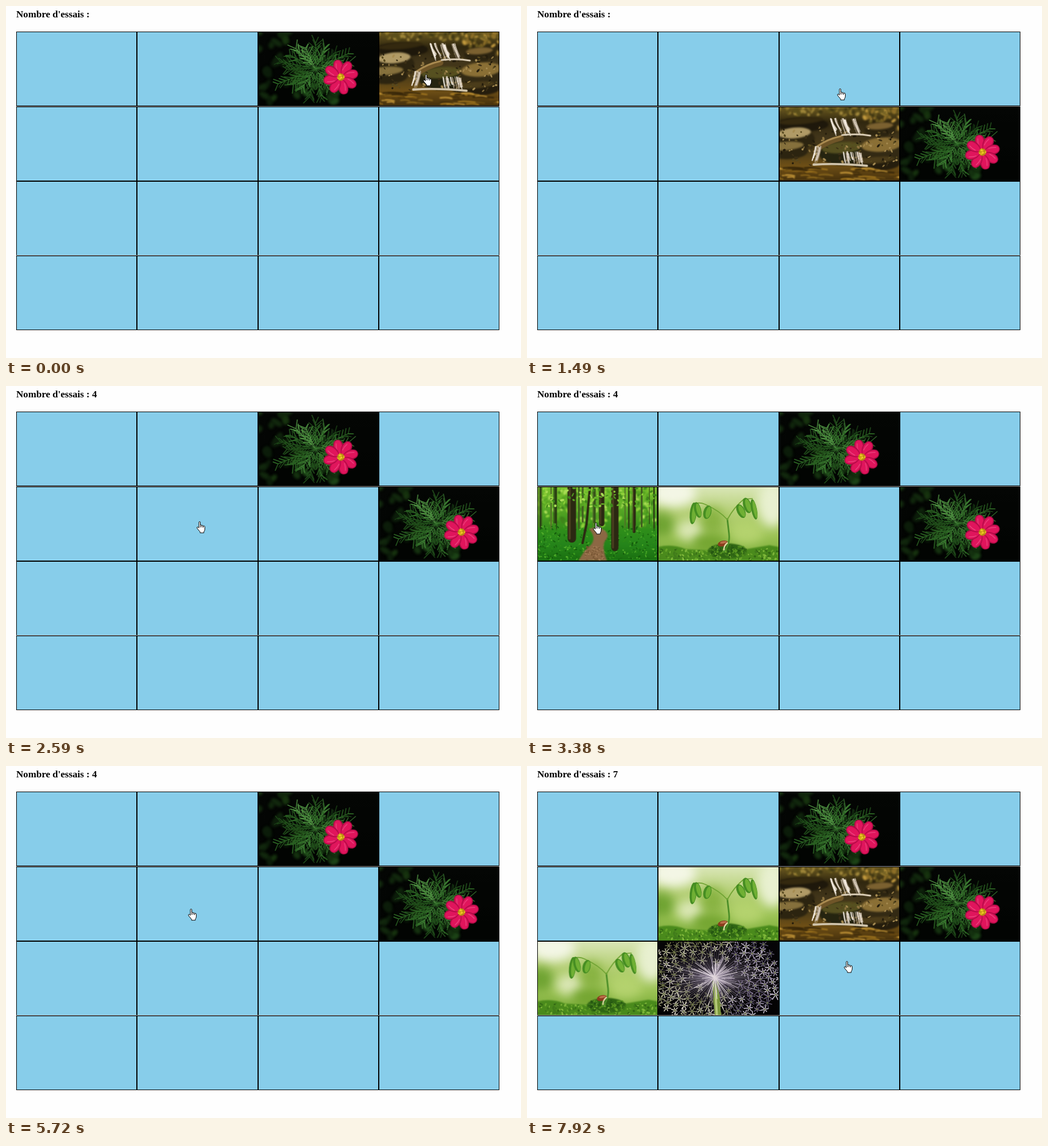
An HTML page with a canvas for the animation above (8000 ms loop, 905 px wide and 619 px high).

```html
<!DOCTYPE html>
<html lang="fr">
<head>
<meta charset="utf-8">
<title>Memory</title>
<style>
html, body { margin: 0; width: 100%; height: 100%; overflow: hidden; background: #fefefe; }
canvas { position: absolute; left: 0; top: 0; }
p { position: absolute; left: 18px; top: 5px; margin: 0; white-space: pre; color: #000;
  font: bold 17.1px/20px "Liberation Serif", "Times New Roman", serif; }
</style>
</head>
<body>
<canvas id="stage" width="905" height="619"></canvas>
<p>Nombre d'essais : <span id="count"></span></p>
<script>
const LOOP = 8000, TAU = Math.PI * 2;
const W = 211, H = 129;              // photo size
const LEFT = 18, TOP = 45.4, STEP_X = 212.25, STEP_Y = 131.3;
const CLOSE_DELAY = 570;             // a wrong pair stays open this long
const edgeX = col => Math.round(LEFT + col * STEP_X);
const edgeY = row => Math.round(TOP + row * STEP_Y);

// Photos lying under the cards, by row
const DEAL = [
  [, , "flower", "falls"],
  ["forest", "sprout", "falls", "flower"],
  ["sprout", "allium"],
  []
];

// Pointer stops; a click turns the card below
const at = (t, x, y) => ({ t, x, y });
const click = (t, x, y) => ({ t, x, y, hit: true });
const STOPS = [
  click(-600, 545, 120), click(-300, 733, 120), at(160, 733, 120),
  click(560, 742, 225), click(1000, 548, 225), at(1490, 545, 145),
  click(1750, 552, 105), click(2046, 735, 225), at(2330, 409, 257),
  at(2590, 335, 238), click(2990, 335, 238), click(3240, 116, 240),
  at(3380, 116, 240), click(4080, 112, 358), at(4710, 272, 335),
  at(4870, 307, 345), click(5140, 150, 250), at(5430, 140, 238),
  at(5720, 320, 251), click(5860, 320, 251), click(6300, 130, 358),
  click(6890, 300, 362), click(7475, 540, 255), at(7920, 557, 343)
];

// Play the game once: when each card is open, and when the score changes
function play() {
  const cards = [], scores = [];
  let tries = 1, first = null;
  for (const { t, x, y } of STOPS.filter(s => s.hit)) {
    const col = Math.floor((x - LEFT) / STEP_X), row = Math.floor((y - TOP) / STEP_Y);
    const card = { col, row, photo: DEAL[row][col], from: t, to: Infinity };
    cards.push(card);
    if (!first) { first = card; continue; }
    tries++;
    if (first.photo === card.photo) scores.push({ t, tries });
    else if (t + CLOSE_DELAY < LOOP) first.to = card.to = t + CLOSE_DELAY;
    first = null;
  }
  return { cards, scores };
}
const { cards, scores } = play();

let seed = 1;
function rnd(a, b = 0) {
  seed = (seed * 16807) % 2147483647;
  return b + (a - b) * seed / 2147483647;
}
const pick = list => list[Math.floor(rnd(list.length))];
const times = (n, f) => { for (let i = 0; i < n; i++) f(i); };

function brush(g) {
  g.lineCap = "round";
  return {
    g,
    fade(y, h, ...stops) {
      const f = g.createLinearGradient(0, y, 0, y + h);
      stops.forEach((c, i) => f.addColorStop(i / (stops.length - 1), c));
      g.fillStyle = f;
      g.fillRect(0, y, W, h);
    },
    oval(c, x, y, rx, ry = rx, turn = 0) {
      g.fillStyle = c;
      g.beginPath();
      g.ellipse(x, y, rx, ry, turn, 0, TAU);
      g.fill();
    },
    shape(c, d) { g.fillStyle = c; g.fill(new Path2D(d)); },
    line(c, w, d) { g.strokeStyle = c; g.lineWidth = w; g.stroke(new Path2D(d)); },
    ray(c, w, x, y, a, r) { this.line(c, w, `M${x} ${y}l${Math.cos(a) * r} ${Math.sin(a) * r}`); },
    soft(px, draw) { g.filter = `blur(${px}px)`; draw(); g.filter = "none"; },
    flecks(n, colors, x, y, w, h, size) {
      times(n, () => this.oval(pick(colors), x + rnd(w), y + rnd(h), rnd(size, size / 3), rnd(size * .6, size / 4), rnd(3)));
    }
  };
}

const PHOTOS = {
  flower(b) {
    b.fade(0, H, "#040604", "#020402");
    b.soft(2, () => {
      b.flecks(22, ["#11270d", "#0c1d0a", "#17330f"], 0, 0, 80, H, 14);
      b.flecks(10, ["#14310f", "#1d4417"], 60, 85, 110, 40, 14);
    });
    const greens = ["#2c6424", "#3d7d33", "#22501c", "#4f9142"];
    times(19, i => {
      const a = i * TAU / 19 + rnd(.2), reach = rnd(1, .65);
      const dx = Math.cos(a) * 76 * reach, dy = Math.sin(a) * 58 * reach;
      const color = pick(greens);
      b.line(color, 1.3, `M100 64l${dx} ${dy}`);
      for (let k = .2; k < 1; k += .1)
        for (const side of [-1, 1])
          b.ray(color, rnd(1.9, .9), 100 + dx * k, 64 + dy * k, a + side * rnd(.9, .4), rnd(17, 8));
    });
    b.g.save();
    b.g.translate(145, 79);
    times(8, i => {
      b.g.rotate(i ? TAU / 8 : -1.78);
      b.shape("#ad0a45", "M3 0C9-10 24-12 30-5Q33 0 29 5C23 11 9 9 3 0Z");
      b.shape("#e0155c", "M4 0C10-8 23-10 29-4Q31 0 28 4C22 8 10 7 4 0Z");
      b.line("#f0568c", 1, "M12-4Q18-5 25-3");
    });
    b.oval("#b88a12", 0, 0, 6.5);
    b.flecks(20, ["#f6d428", "#e2b51c"], -5, -5, 10, 10, 2);
    b.g.restore();
  },

  falls(b) {
    b.fade(0, H, "#6c5a20", "#30270f", "#41351a", "#4a3b18", "#6e4f16", "#46310d");
    const rock = (x, y, rx, ry, top, base = "#2c2410") => {
      b.oval(base, x, y + ry * .3, rx, ry);
      b.oval(top, x - rx * .05, y - ry * .25, rx * .85, ry * .5, -.08);
    };
    b.soft(1.5, () => {
      b.flecks(60, ["#8a742b", "#5b4f1b", "#a48a3c", "#3f3814"], 0, 0, W, 14, 6);
      b.flecks(45, ["#c39a3e", "#8f7028", "#6a5a20"], 150, 2, 61, 38, 6);
      rock(40, 27, 46, 12, "#34290f", "#1e180b");
      rock(28, 50, 34, 19, "#b09a66");
      rock(12, 72, 38, 15, "#85703c");
      rock(112, 76, 42, 20, "#565020", "#252410");
      rock(182, 72, 42, 25, "#8a6f35", "#332a14");
      rock(178, 36, 28, 12, "#7b6130");
      rock(170, 96, 42, 12, "#4b3c1a", "#251d0d");
    });
    b.soft(.6, () => b.flecks(150, ["#8d7440", "#3b2f16", "#a78c52", "#57491f", "#221b0c"], 0, 34, W, 70, 3.5));
    b.soft(.7, () => {
      b.line("#6f5528", 10, "M66 73Q84 60 108 54");
      b.line("#a98a50", 3, "M66 69Q84 56 108 51");
    });
    const pour = (x, y, w, h, lean) => {
      const white = ["#f3e8dc", "#d2c4b0", "#fff8ee", "#a3937a"];
      times(w * .6, () => {
        const x0 = x + rnd(w);
        b.line(pick(white), rnd(2.2, .7), `M${x0} ${y + rnd(4)}q${lean * .2} ${h * .3} ${lean} ${h * rnd(1, .55)}`);
      });
    };
    b.soft(.7, () => {
      pour(84, 19, 50, 28, 9);
      pour(62, 68, 12, 32, -6);
      pour(112, 78, 34, 22, 3);
      b.line("#d9ccb5", 3, "M110 49Q138 46 160 50");
      b.line("#cfc3aa", 4, "M60 101Q100 98 154 103");
    });
    b.soft(1, () => times(45, () =>
      b.line(pick(["#a87b20", "#6b4a12", "#352509", "#c49638", "#8a671d"]), rnd(3, 1),
        `M${rnd(W, -20)} ${rnd(128, 107)}q12 -2 ${rnd(38, 10)} 1`)));
  },

  sprout(b) {
    b.fade(0, H, "#d9e6b6", "#b6d077", "#9cc355", "#6fa530");
    b.soft(9, () => {
      b.oval("#f3f6e5", 26, 10, 40, 24);
      b.oval("#6fa332", 4, 66, 24, 22);
      b.oval("#dbe7b6", 56, 76, 24, 18);
      b.oval("#88b342", 95, 58, 20, 24);
      b.oval("#b4d26e", 155, 78, 30, 22);
      b.oval("#e8f0d0", 200, 30, 26, 40);
      b.oval("#74a531", 90, 98, 30, 16);
    });
    b.soft(1.2, () => {
      b.shape("#4a8a1c", "M0 105Q24 99 48 109L86 111Q120 90 154 109L195 102 211 105V130H0Z");
      b.oval("#2f6514", 121, 112, 34, 13);
    });
    b.flecks(170, ["#66a329", "#417c1b", "#7db539", "#336815"], 0, 109, W, 20, 3.5);
    b.flecks(75, ["#38731a", "#54911f", "#255612"], 93, 102, 58, 20, 3);
    b.line("#4b8e28", 2.8, "M115 113Q126 101 124 82L121 56");
    b.line("#6fa332", 1.7, "M121 57Q108 42 84 31Q71 25 62 30M121 57Q132 36 150 21L165 20");
    const leaf = (x, y, rx, ry, turn) => {
      b.oval("#458d22", x, y, rx, ry, turn);
      b.oval("#70b034", x + 1.5, y, rx * .6, ry * .85, turn);
    };
    leaf(61, 46, 6, 19, .1);
    leaf(69, 40, 6, 14, -.25);
    leaf(86, 44, 7, 12, .25);
    leaf(145, 42, 7, 13, -.45);
    leaf(156, 32, 7, 14, -.3);
    leaf(168, 39, 5, 18, -.2);
    b.oval("#8b3c1d", 113, 99, 9, 5, -.25);
    b.oval("#b8704a", 114, 97, 6, 2, -.2);
    b.line("#dbd8a1", 2.5, "M121 98Q115 103 115 110");
  },

  forest(b) {
    b.fade(0, H, "#7cc22e", "#5fae28", "#3b921c", "#26821a", "#1c7212");
    const leaves = ["#8fd03a", "#57a322", "#aade55", "#3f861b", "#6cb92b"];
    b.soft(1, () => b.flecks(200, leaves, 0, 0, W, 68, 6));
    times(30, () => b.line(pick(["#2f4f16", "#3f5a20", "#2a3c14", "#56792a"]), rnd(3.2, .8),
      `M${rnd(W)} 0v${rnd(80, 58)}`));
    b.soft(2, () => b.fade(74, 55, "#2f8f1a", "#25841a", "#1a6f10"));
    b.flecks(380, ["#3ea020", "#1b6a10", "#2c8a18", "#55b02c", "#145a0c"], 0, 68, W, 61, 2.6);
    b.soft(.8, () => b.shape("#8c6844", "M90 73Q108 68 118 76Q128 84 119 94Q112 104 122 129H72Q82 110 94 101Q104 88 90 73Z"));
    b.flecks(60, ["#a37c55", "#775533"], 84, 104, 32, 24, 2.5);
    const trunk = (x, w, h) => {
      b.line("#2b2812", w, `M${x} -9V${h}`);
      b.line("#4b4020", w * .25, `M${x - w * .25} -9V${h}`);
    };
    trunk(60, 15, 90);
    trunk(136, 13, 106);
    trunk(113, 9, 64);
    trunk(170, 5, 78);
    b.line("#2b2812", 4, "M92 0L86 65 79 98");
    b.flecks(90, leaves, 0, 0, W, 34, 4);
  },

  allium(b) {
    const cx = 99, cy = 63;
    b.fade(0, H, "#060507", "#040304");
    const star = (x, y, r, c) => {
      const turn = rnd(TAU);
      times(6, k => b.ray(c, 1.5, x, y, turn + k * TAU / 6, r * rnd(1, .6)));
      b.oval("#6c7548", x, y, 1.6);
    };
    const cream = ["#8f8f6c", "#c4c3a4", "#6d7048", "#e2dccb"];
    const lilac = ["#7d7090", "#aa9fba", "#5d566e", "#d3cadb"];
    times(170, i => {
      const a = i * 2.4, r = 28 + 92 * Math.sqrt(i / 170);
      const x = cx + Math.cos(a) * r, y = cy + Math.sin(a) * r * .72;
      const color = pick(x > 125 ? lilac : cream);
      b.line(pick(["#73667c", "#9f95a6", "#5a5062"]), .7, `M${cx} ${cy}L${x} ${y}`);
      star(x, y, rnd(11, 6), color);
    });
    b.line("#7a963c", 11, "M100 72L105 135");
    b.line("#b4c877", 4, "M99 72L103 135");
    times(80, () => b.ray(pick(["#d8cdd8", "#b3a6b8", "#f2e9ee", "#8f8496"]), 1, cx, cy, rnd(TAU), rnd(46, 15)));
    b.soft(2, () => b.oval("#e0d6da", cx, cy, 5));
  }
};

const photos = {};
for (const name in PHOTOS) {
  const c = photos[name] = document.createElement("canvas");
  c.width = W;
  c.height = H;
  seed = 4001;
  PHOTOS[name](brush(c.getContext("2d")));
}

const g = document.getElementById("stage").getContext("2d");
const count = document.getElementById("count");
const hand = new Path2D("M4 1.8Q4 .5 5.2 .5Q6.5 .5 6.5 1.8V6.8Q8.2 5.8 9 7.3Q10.8 6.6 11.6 8.2Q14.4 7.4 14.4 9.8V14Q14.2 16.6 12.7 18.2V20.2H6V18.4L1.4 13Q-.3 10.6 1.2 9.9Q2.6 9.3 4 11.6Z");
const knuckles = new Path2D("M6.5 7.5v3M9 7.5v3M11.5 8v3");

function pointer(t) {
  const i = STOPS.findIndex(s => s.t > t);
  if (i < 0) return STOPS[STOPS.length - 1];
  const a = STOPS[i - 1], b = STOPS[i], k = (t - a.t) / (b.t - a.t), e = k * k * (3 - 2 * k);
  return { x: Math.round(a.x + (b.x - a.x) * e), y: Math.round(a.y + (b.y - a.y) * e) };
}

function drawBoard(t) {
  g.fillStyle = "#000";
  g.fillRect(LEFT, edgeY(0), edgeX(4) - LEFT, edgeY(4) - edgeY(0) - 1);
  for (let row = 0; row < 4; row++) {
    const y = edgeY(row);
    g.fillStyle = "#999";
    if (row % 2) g.fillRect(LEFT, y - 1, edgeX(4) - LEFT, 1);
    for (let col = 0; col < 4; col++) {
      const x = edgeX(col) + 1, w = edgeX(col + 1) - 1 - x;
      const open = cards.find(c => c.col === col && c.row === row && t >= c.from && t < c.to);
      g.fillStyle = "#87cdea";
      if (open) g.drawImage(photos[open.photo], x, y + 1, w, H);
      else g.fillRect(x, y + 1, w, H);
    }
  }
}

function drawHand({ x, y }) {
  g.save();
  g.translate(x, y);
  g.fillStyle = "#fff";
  g.fill(hand);
  g.strokeStyle = "#000";
  g.stroke(hand);
  g.stroke(knuckles);
  g.restore();
}

function render(t) {
  g.clearRect(0, 0, 905, 619);
  drawBoard(t);
  drawHand(pointer(t));
  const last = scores.filter(s => s.t <= t).pop();
  count.textContent = last ? last.tries : "";
}

let start = null;
function loop(now) {
  if (start === null) start = now;
  render((now - start) % LOOP);
  requestAnimationFrame(loop);
}
render(0);
requestAnimationFrame(loop);
</script>
</body>
</html>
```
